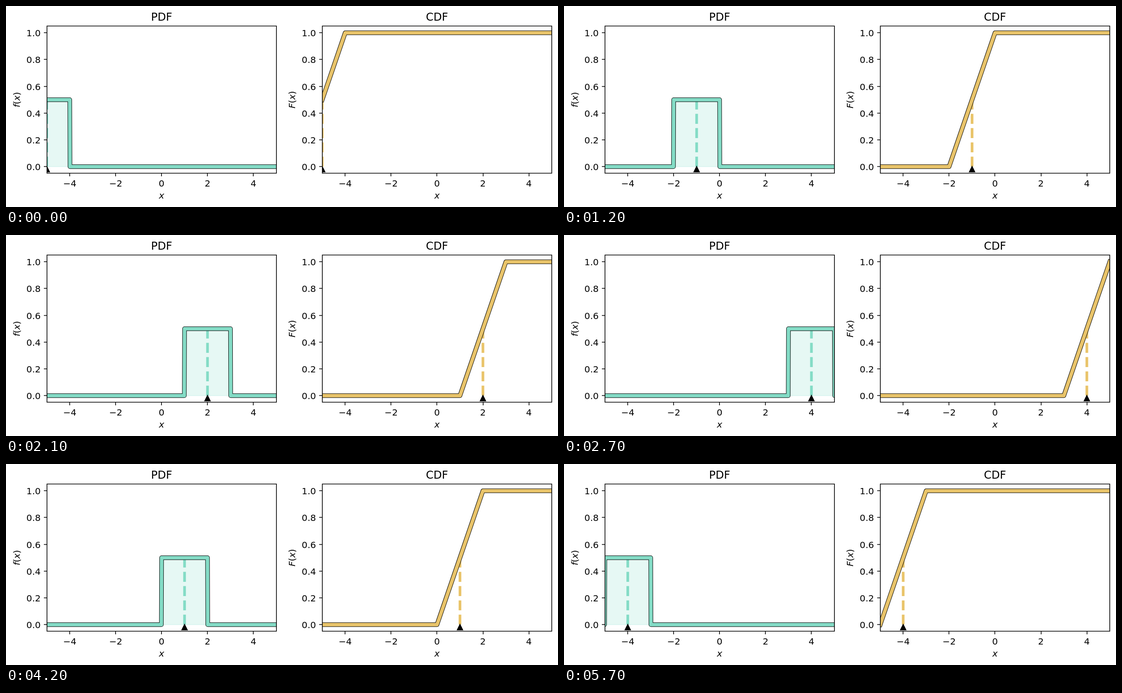
Animation of 1239 by 452 pixels, one loop 6000 ms. Source, as an HTML page with a canvas:

```html
<!DOCTYPE html>
<html lang="en">
<head>
<meta charset="utf-8">
<title>Uniform distribution: PDF and CDF</title>
<style>
  html, body { margin: 0; width: 100%; height: 100%; overflow: hidden; background: #fff; }
  canvas { display: block; }
</style>
</head>
<body>
<canvas id="stage" width="1239" height="452"></canvas>
<script>
const ctx = document.getElementById('stage').getContext('2d');
const STEP_MS = 300, STEPS = 20, DX = 0.01;
const FONT = '"DejaVu Sans", sans-serif';
const TICK_SIZE = 20.1, TITLE_SIZE = 24.4;

const panels = [
  { title: 'PDF', symbol: 'f', left: 91.6, color: '#84dcc6', filled: true,
    curve: mu => [[-9, 0], [mu - 1 - DX, 0], [mu - 1, 0.5], [mu + 1, 0.5], [mu + 1 + DX, 0], [9, 0]] },
  { title: 'CDF', symbol: 'F', left: 709.8, color: '#e9c46a', filled: false,
    curve: mu => {
      const cdf = x => Math.min(1, Math.max(0, (x - mu + 1) / 2));
      return [-5, mu - 1, mu + 1, 5].filter(x => Math.abs(x) <= 5).map(x => [x, cdf(x)]);
    } }
];

const yPos = v => 361.2 - v * 301;
const xPos = (panel, v) => panel.left + (v + 5) * 51.53;
const TOP = Math.round(yPos(1.05)), BOTTOM = Math.round(yPos(-0.05));

function trace(points) {
  ctx.beginPath();
  points.forEach(([x, y]) => ctx.lineTo(x, y));
}

function stroke(color, width) {
  ctx.strokeStyle = color;
  ctx.lineWidth = width;
  ctx.stroke();
}

function text(str, x, y, size, align = 'center', style = '') {
  ctx.font = `${style} ${size}px ${FONT}`;
  ctx.textAlign = align;
  ctx.fillText(str, x, y);
}

function drawData(panel, mu) {
  const toPixels = points => points.map(([x, y]) => [xPos(panel, x), yPos(y)]);
  const curve = panel.curve(mu);
  const x = xPos(panel, mu);

  if (panel.filled) {
    ctx.globalAlpha = 0.2;
    ctx.fillStyle = panel.color;
    trace(toPixels(curve.slice(1, 5).map(([px, py]) => [Math.max(-5, Math.min(5, px)), py])));
    ctx.closePath();
    ctx.fill();
    stroke(panel.color, 2);
    ctx.globalAlpha = 1;
  }

  ctx.lineCap = 'butt';
  ctx.setLineDash([22.4, 9.7]);
  trace([[x, yPos(0)], [x, yPos(0.5)]]);
  stroke(panel.color, 6);
  ctx.setLineDash([]);

  ctx.lineCap = 'square';
  ctx.lineJoin = 'round';
  trace(toPixels(curve));
  stroke('#000', 10);
  stroke(panel.color, 8);

  ctx.lineJoin = 'miter';
  ctx.fillStyle = '#000';
  trace([[x, 361], [x - 6, 373], [x + 6, 373]]);
  ctx.closePath();
  ctx.fill();
  stroke('#000', 2);
}

function drawAxes(panel) {
  const left = Math.round(panel.left), right = Math.round(xPos(panel, 5));
  const middle = xPos(panel, 0);
  ctx.fillStyle = '#000';
  ctx.lineCap = 'butt';
  ctx.beginPath();
  ctx.rect(left, TOP, right - left, BOTTOM - TOP);
  for (let v = -4; v <= 4; v += 2) {
    const x = Math.round(xPos(panel, v));
    ctx.moveTo(x, BOTTOM);
    ctx.lineTo(x, BOTTOM + 7);
    text(String(v).replace('-', '\u2212'), xPos(panel, v), 406, TICK_SIZE);
  }
  for (let i = 0; i <= 5; i++) {
    const y = Math.round(yPos(i / 5));
    ctx.moveTo(left, y);
    ctx.lineTo(left - 7, y);
    text((i / 5).toFixed(1), left - 14.2, y + 7.5, TICK_SIZE, 'right');
  }
  stroke('#000', 1.6);

  text(panel.title, middle, 33, TITLE_SIZE);
  text('x', middle, 433, TICK_SIZE, 'center', 'italic');
  drawYLabel(panel);
}

function drawYLabel(panel) {
  const parts = [[panel.symbol, 'italic'], ['(', ''], ['x', 'italic'], [')', '']];
  const widths = parts.map(([str, style]) => {
    ctx.font = `${style} ${TICK_SIZE}px ${FONT}`;
    return ctx.measureText(str).width;
  });
  let x = -widths.reduce((a, b) => a + b) / 2;
  ctx.save();
  ctx.translate(panel.left - 60.4, 210.7);
  ctx.rotate(-Math.PI / 2);
  parts.forEach(([str, style], i) => {
    text(str, x, 0, TICK_SIZE, 'left', style);
    x += widths[i];
  });
  ctx.restore();
}

function draw() {
  const step = Math.floor(performance.now() / STEP_MS) % STEPS;
  const mu = 5 - Math.abs(step - 10);
  ctx.fillStyle = '#fff';
  ctx.fillRect(0, 0, 1239, 452);
  for (const panel of panels) {
    ctx.save();
    ctx.beginPath();
    const left = Math.round(panel.left);
    ctx.rect(left, TOP, Math.round(xPos(panel, 5)) - left, BOTTOM - TOP);
    ctx.clip();
    drawData(panel, mu);
    ctx.restore();
    drawAxes(panel);
  }
  requestAnimationFrame(draw);
}
draw();
</script>
</body>
</html>
```
